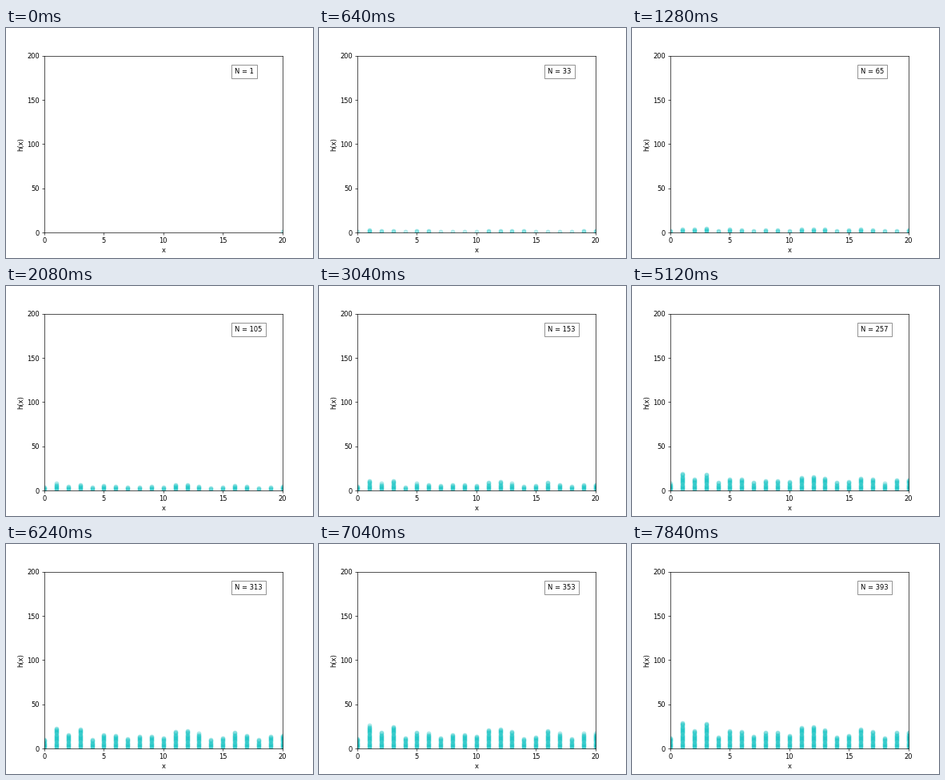
Animation of 384 by 288 pixels, one loop 8000 ms. Source, as a matplotlib script:

```python
import random

import matplotlib.pyplot as plt
from matplotlib.animation import FuncAnimation

FRAMES = 50
STEP = 8      # draws added per frame
FIRST = 20    # x of the opening draw

# Final column heights for x = 0..20
HEIGHTS = [12, 29, 20, 28, 13, 20, 19, 14, 18, 18, 15,
           24, 25, 21, 13, 15, 22, 19, 12, 18, 18]


def draw_order():
    """Dots (x, height) in drawing order; columns grow at a jittered, steady pace."""
    rng = random.Random(4)
    timed = []
    for x, top in enumerate(HEIGHTS):
        for k in range(top):
            opening = x == FIRST and k == 0
            when = 0 if opening else (k + rng.uniform(0.05, 1)) / top
            timed.append((when, x, k + 1))
    timed.sort()
    return [(x, h) for _, x, h in timed]


xs, ys = zip(*draw_order())

fig, ax = plt.subplots(figsize=(6.4, 4.8), dpi=60)
ax.set_xlim(0, 20)
ax.set_ylim(0, 200)
ax.set_xticks(range(0, 21, 5))
ax.set_yticks(range(0, 201, 50))
ax.set_xlabel("x")
ax.set_ylabel("h(x)")

dots, = ax.plot([], [], "o", color="c", alpha=0.25)
label = ax.text(16, 180, "", bbox=dict(facecolor="white", alpha=0.5, pad=5))


def update(frame):
    n = 1 + STEP * frame
    dots.set_data(xs[:n], ys[:n])
    label.set_text(f"N = {n}")
    return dots, label


anim = FuncAnimation(fig, update, frames=FRAMES, interval=160,
                     repeat=True, repeat_delay=0)
plt.show()
```
